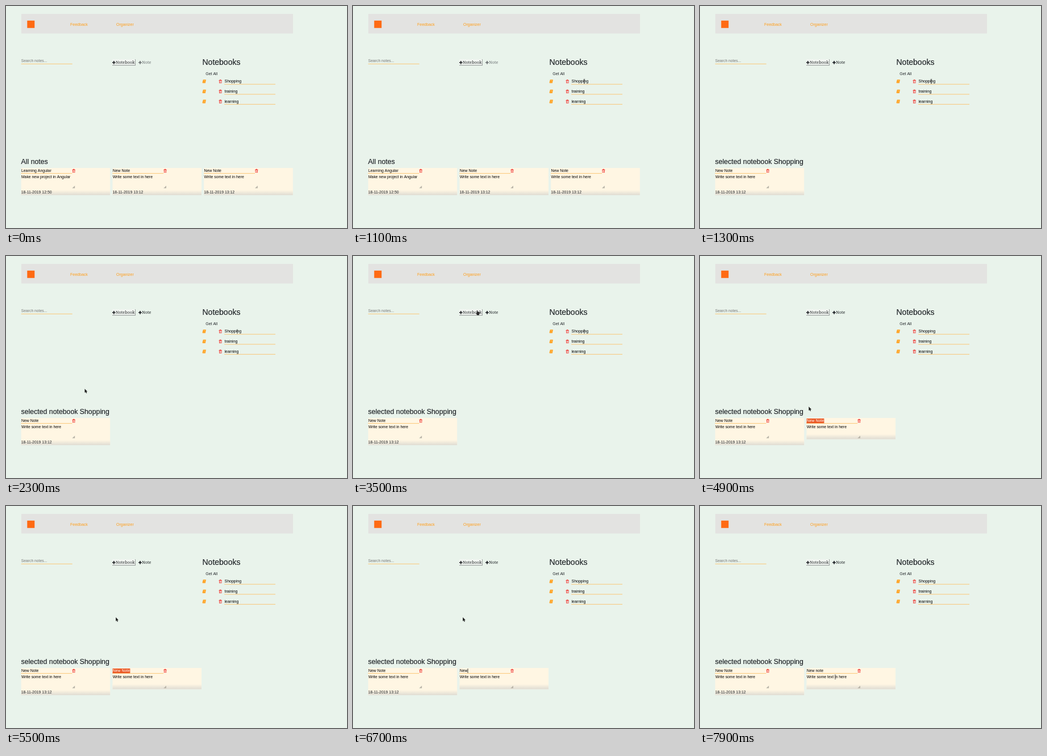
Animation of 600 by 392 pixels, one loop 8000 ms. Source, as an HTML page with a canvas:

```html
<!DOCTYPE html>
<html lang="en">
<head>
<meta charset="utf-8">
<title>Notes</title>
<style>
  html, body { margin: 0; width: 100%; height: 100%; overflow: hidden; background: #e9f3eb; }
  canvas { display: block; width: 600px; height: 392px; }
</style>
</head>
<body>
<canvas id="stage" width="600" height="392"></canvas>
<script>
const ctx = document.getElementById('stage').getContext('2d');
const LOOP = 8000, TICK = 100;
const SANS = '"Liberation Sans", Arial, sans-serif';
const SERIF = '"Noto Serif", serif';
const PAGE = '#e9f3eb', INK = '#212529', ORANGE = '#ff9f1c', RED = '#f0413c', CARD = '#fff6e3';

const ENTRY = { x: 503, y: 277 };
// Each trip follows a quadratic curve from where the last one ended
const TRIPS = [
  { from: 3, to: 9, bend: { x: 405, y: 95 }, end: { x: 407, y: 133 } },
  { from: 15, to: 25, bend: { x: -48, y: 516 }, end: { x: 215, y: 100 } },
  { from: 34, to: 40, bend: { x: 229, y: 100 }, end: { x: 243, y: 100 } },
  { from: 44, to: 46, bend: { x: 259, y: 191 }, end: { x: 274.6, y: 281.7 } },
  { from: 46, to: 50, bend: { x: 220, y: 280 }, end: { x: 163, y: 255 } },
  { from: 50, to: 55, bend: { x: 222, y: 205 }, end: { x: 193.2, y: 196.5 } },
  { from: 75, to: 79, bend: { x: 240, y: 340 }, end: { x: 238, y: 302 } }
];

function rect(x, y, w, h, color) {
  ctx.fillStyle = color;
  ctx.fillRect(x, y, w, h);
}

function text(str, x, y, size, color = '#000', family = SANS) {
  ctx.font = `${size}px ${family}`;
  ctx.fillStyle = color;
  ctx.fillText(str, x, y);
}

function heading(str, x, y, size) {
  text(str, x, y, size, INK);
  ctx.strokeStyle = INK;
  ctx.lineWidth = 0.2;
  ctx.strokeText(str, x, y);
}

function poly(points, color) {
  ctx.beginPath();
  for (const [x, y] of points) ctx.lineTo(x, y);
  ctx.closePath();
  ctx.fillStyle = color;
  ctx.fill();
}

function at(x, y, draw) {
  ctx.save();
  ctx.translate(x, y);
  draw();
  ctx.restore();
}

function underline(x, y) {
  rect(x, y, 90, 0.9, '#fbc26c');
}

function trash(x, y) {
  at(x, y, () => {
    ctx.strokeStyle = RED;
    ctx.lineWidth = 0.8;
    ctx.strokeRect(1, 1.6, 3.6, 4.4);
    ctx.strokeRect(1.9, 0.4, 1.8, 1);
    rect(0, 1.1, 5.6, 0.8, RED);
    for (const dx of [2, 3.3]) rect(dx, 2.8, 0.4, 2.4, RED);
  });
}

function book(x, y) {
  at(x, y, () => {
    poly([[1.3, 0], [6.3, 0], [5.2, 6.2], [0.4, 6.2], [0, 5]], ORANGE);
    rect(2.3, 1.4, 2.6, 0.4, '#ffe0b0');
    rect(2, 2.5, 2.6, 0.4, '#ffe0b0');
    rect(1, 5, 3.8, 0.4, '#ffe0b0');
  });
}

function plusLabel(label, x, color) {
  rect(x, 98.9, 5.6, 1.8, color);
  rect(x + 1.9, 97, 1.8, 5.6, color);
  text(label, x + 6, 102.3, 7.3, color, SERIF);
}

function caret(x, y) {
  rect(x, y, 0.7, 8, '#000');
}

function card(x, title, body, date) {
  const h = date ? 48 : 37.5;
  const shade = ctx.createLinearGradient(0, 286 + h - 9, 0, 286 + h);
  shade.addColorStop(0, CARD);
  shade.addColorStop(1, '#dfdcd3');
  rect(x, 286, 156.5, h, CARD);
  rect(x, 286 + h - 9, 156.5, 9, shade);
  underline(x - 0.3, 295.2);
  trash(x + 89.7, 287.8);
  text(title, x + 0.2, 293.2, 6.95);
  text(body, x + 0.2, 304.1, 6.85);
  poly([[x + 94.5, 317.2], [x + 94.5, 321.8], [x + 89.7, 321.8]], '#b9b4a8');
  if (date) text(date, x, 330.8, 6.9, INK);
}

const shapes = {
  arrow() {
    poly([[0, 0], [0, 7], [1.5, 5.6], [2.6, 8], [3.8, 7.4], [2.8, 5.1], [4.8, 5]], '#1c1c1c');
  },
  beam() {
    rect(-0.35, -3.8, 0.7, 7.6, '#444');
    for (const y of [-4.2, 3.4]) rect(-1.3, y, 2.6, 0.7, '#666');
  },
  hand() {
    poly([[-1.8, -4], [-0.6, -4], [-0.4, -1.6], [2.6, -1], [3.2, 0],
          [2, 4.6], [-1.2, 4.6], [-3.4, 1], [-1.8, 1]], '#2a2a2a');
  }
};

function shapeOver({ x, y }) {
  const inside = (l, t, r, b) => x >= l && x <= r && y >= t && y <= b;
  if (inside(187, 94, 262, 105)) return 'hand';
  if (inside(384, 120, 474, 174) || inside(188, 286, 282, 322)) return 'beam';
  return 'arrow';
}

function pointer(tick) {
  if (tick < TRIPS[0].from) return;
  let pos = ENTRY;
  for (const { from, to, bend, end } of TRIPS) {
    if (tick < from) break;
    const k = Math.min(1, (tick - from) / (to - from)), start = pos;
    const mix = c => (1 - k) ** 2 * start[c] + 2 * k * (1 - k) * bend[c] + k * k * end[c];
    pos = { x: mix('x'), y: mix('y') };
  }
  at(pos.x, pos.y, shapes[shapeOver(pos)]);
}

function header() {
  rect(27, 14, 478, 34.5, '#e3e3e1');
  rect(37.3, 25.8, 13, 13, '#ff6a13');
  text('Feedback', 113, 35, 7.03, ORANGE);
  text('Organizer', 194, 35, 7.03, ORANGE);
}

function tools(tick) {
  text('Search notes...', 26.8, 99.4, 6.75, '#757575');
  underline(26.7, 101.8);
  rect(187, 94, 41, 11, '#f1f5f1');
  rect(187, 104.2, 41, 0.9, '#858a89');
  rect(227.1, 94, 0.8, 11, '#858a89');
  plusLabel('Notebook', 187, '#2d3032');
  if (tick >= 41 && tick < 47) {
    ctx.beginPath();
    ctx.roundRect(227.6, 91.3, 34, 17.4, 2);
    ctx.strokeStyle = '#a3c7ea';
    ctx.lineWidth = 0.9;
    ctx.stroke();
  }
  plusLabel('Note', 233.2, tick < 13 ? '#707577' : INK);
}

function notebooks(tick) {
  heading('Notebooks', 345.5, 104.3, 14);
  text('Get All', 351.2, 122.3, 7, INK);
  ['Shopping', 'training', 'learning'].forEach((name, i) => {
    const y = 129.6 + i * 17.75;
    book(345.6, y + 0.4);
    trash(374.4, y + 0.3);
    text(name, 384.5, y + 5.8, 7);
    underline(384, y + 8.1);
  });
  if (tick >= 11 && tick < 40) caret(406.7, 129.3);
}

function typed(tick) {
  if (tick < 63) return 'New Note';
  if (tick < 64) return '';
  if (tick < 67) return 'N';
  if (tick < 69) return 'New';
  return tick < 71 ? 'New n' : 'New note';
}

function notes(tick) {
  const body = 'Write some text in here', stamp = '18-11-2019 13:12';
  const all = tick < 13;
  heading(all ? 'All notes' : 'selected notebook Shopping', 26.6, 279.1, 12.3);
  if (all) {
    card(26.7, 'Learning Angular', 'Make new project in Angular', '18-11-2019 12:50');
    card(187.5, 'New Note', body, stamp);
    card(348.3, 'New Note', body, stamp);
    return;
  }
  card(26.7, 'New Note', body, stamp);
  if (tick < 47) return;
  const title = typed(tick);
  card(187.5, title, body);
  ctx.font = `6.95px ${SANS}`;
  const w = ctx.measureText(title).width;
  if (tick < 63) {
    rect(187.5, 287, w + 0.4, 8.2, '#e95420');
    text(title, 187.7, 293.2, 6.95, '#fff');
  } else if (tick < 74) {
    caret(187.8 + w, 287);
  }
}

function draw(now) {
  const tick = Math.floor((now % LOOP) / TICK);
  rect(0, 0, 600, 392, PAGE);
  header();
  tools(tick);
  notebooks(tick);
  notes(tick);
  pointer(tick);
}

const start = performance.now();
(function loop() {
  draw(performance.now() - start);
  requestAnimationFrame(loop);
})();
</script>
</body>
</html>
```
